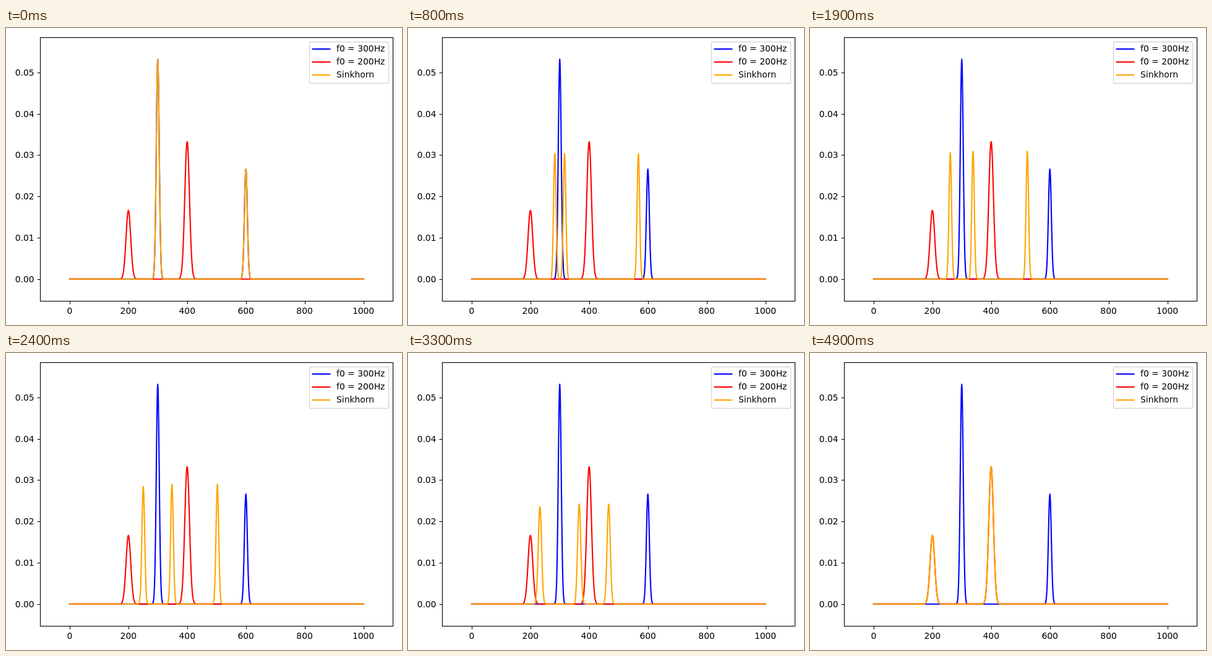
These frames come from a looping animation (640x480 px, 5000 ms). An HTML page with a canvas:

```html
<!DOCTYPE html>
<html lang="en">
<head>
<meta charset="utf-8">
<title>Spectrum interpolation</title>
<style>
  html, body { margin: 0; width: 100%; height: 100%; overflow: hidden; background: #fff; }
  canvas { display: block; }
</style>
</head>
<body>
<canvas id="plot" width="640" height="480"></canvas>
<script>
const ctx = document.getElementById('plot').getContext('2d');
const STEPS = 50, STEP_MS = 100;
const AXES = { left: 55.4, right: 625, top: 15, bottom: 441.28 };
const BLUE = '#0000ff', RED = '#ff0000', ORANGE = '#ffa500';

const gauss = (d, variance) => Math.exp(-d * d / (2 * variance)) / Math.sqrt(2 * Math.PI * variance);
const peak = (weight, mean, variance) => ({ weight, mean, variance });

// Axis limits leave a tenth of the data range free on every side.
const yMax = 2 / 3 * gauss(0, 25);
const px = f => AXES.left + (AXES.right - AXES.left) * (f + 100) / 1200;
const py = v => AXES.bottom - (AXES.bottom - AXES.top) * (v / yMax + 0.1) / 1.2;
const snap = p => Math.floor(p + 0.5) + 0.5;

const blue = [peak(2 / 3, 300, 25), peak(1 / 3, 600, 25)];
const red = [peak(1 / 3, 200, 64), peak(2 / 3, 400, 64)];

// Half of a peak that a soft plan sends to one side: moved outwards, slightly narrower.
const share = (mean, variance, shift) => peak(1 / 3, mean + shift, variance - shift * shift);
const routes = [
  [share(300, 25, -0.5), share(200, 64, 0)],
  [share(300, 25, 0.5), share(400, 64, -1.87)],
  [share(600, 25, 0), share(400, 64, 1.87)]
];

const blend = t => routes.map(([a, b]) => peak(
  1 / 3,
  (1 - t) * a.mean + t * b.mean,
  (1 - t) ** 2 * a.variance + t ** 2 * b.variance
));

function line(points, color, width, cap = 'butt') {
  ctx.beginPath();
  points.forEach(([x, y]) => ctx.lineTo(x, y));
  ctx.strokeStyle = color;
  ctx.lineWidth = width;
  ctx.lineCap = cap;
  ctx.lineJoin = 'round';
  ctx.stroke();
}

function curve(peaks, color) {
  const points = [];
  for (let f = 0; f <= 1000; f++) {
    const v = peaks.reduce((sum, p) => sum + p.weight * gauss(f - p.mean, p.variance), 0);
    points.push([px(f), py(v)]);
  }
  line(points, color, 2.083, 'square');
}

function label(text, x, y, align) {
  ctx.textAlign = align;
  ctx.fillStyle = '#000';
  ctx.fillText(text, x, y);
}

function drawAxes() {
  const l = snap(AXES.left), r = snap(AXES.right), t = snap(AXES.top), b = snap(AXES.bottom);
  ctx.lineJoin = 'miter';
  ctx.lineWidth = 1.11;
  ctx.strokeStyle = '#000';
  ctx.strokeRect(l, t, r - l, b - t);
  for (let f = 0; f <= 1000; f += 200) {
    const x = snap(px(f));
    line([[x, b], [x, b + 4.86]], '#000', 1.11);
    label(f, px(f), 462, 'center');
  }
  for (let i = 0; i <= 5; i++) {
    const y = py(i / 100);
    line([[l, snap(y)], [l - 4.86, snap(y)]], '#000', 1.11);
    label((i / 100).toFixed(2), 45.7, Math.round(y + 5), 'right');
  }
}

function drawLegend() {
  ctx.beginPath();
  ctx.roundRect(490.5, 22.5, 128, 67, 2.78);
  ctx.fillStyle = 'rgba(255,255,255,0.8)';
  ctx.fill();
  ctx.strokeStyle = 'rgba(204,204,204,0.8)';
  ctx.lineWidth = 1.39;
  ctx.stroke();
  [['f0 = 300Hz', BLUE], ['f0 = 200Hz', RED], ['Sinkhorn', ORANGE]].forEach(([text, color], i) => {
    const y = 34 + 21 * i;
    line([[495.6, y], [523.4, y]], color, 2.083, 'square');
    label(text, 534, y + 4, 'left');
  });
}

function draw(step) {
  ctx.fillStyle = '#fff';
  ctx.fillRect(0, 0, 640, 480);
  ctx.font = '13.89px "DejaVu Sans", sans-serif';
  curve(blue, BLUE);
  curve(red, RED);
  curve(blend(step / (STEPS - 1)), ORANGE);
  drawAxes();
  drawLegend();
}

const start = performance.now();
function tick() {
  draw(Math.floor((performance.now() - start) / STEP_MS) % STEPS);
  requestAnimationFrame(tick);
}
tick();
</script>
</body>
</html>
```
